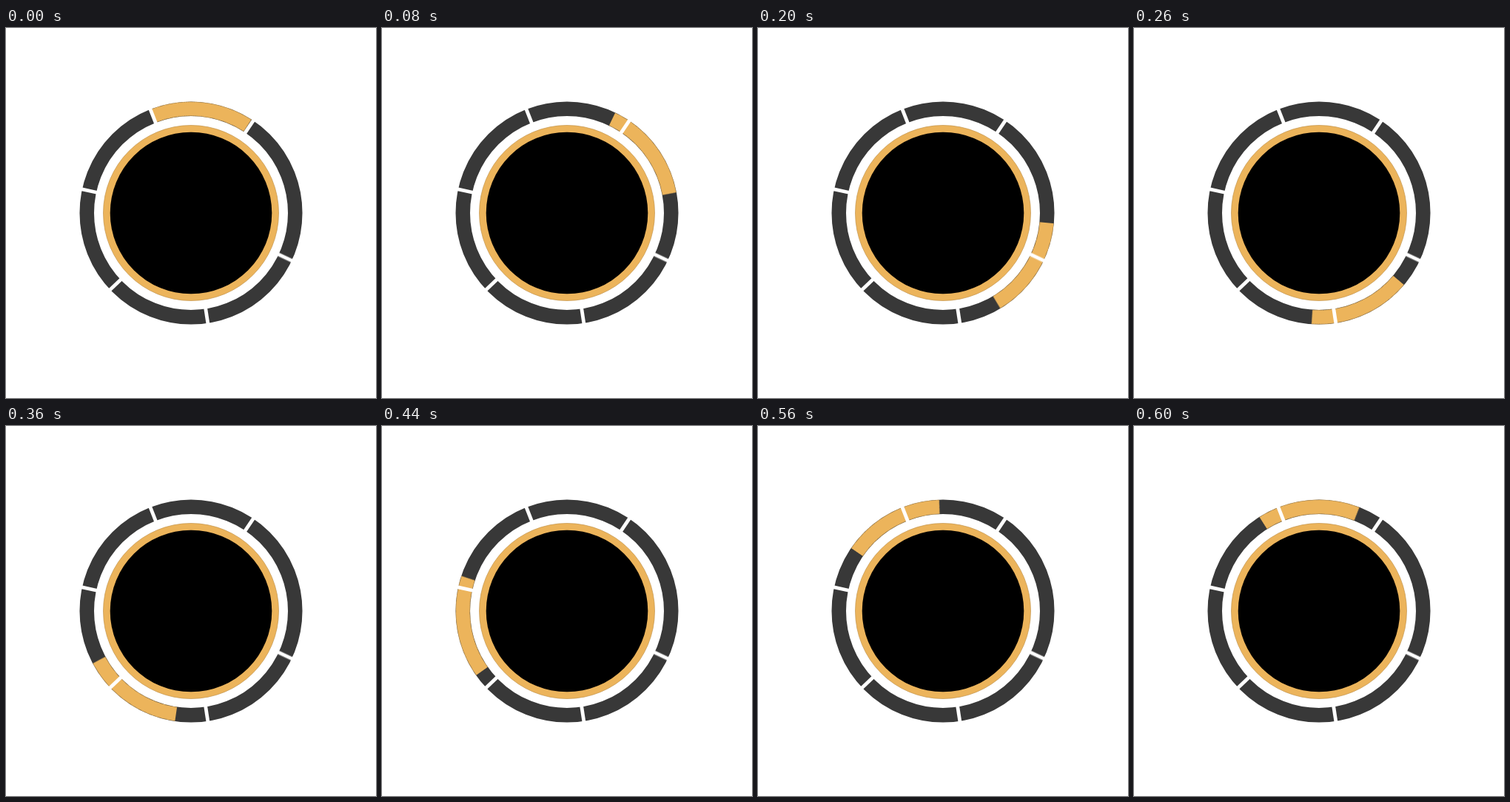
An HTML page that plays this animation: 500x500 px, repeating every 620 ms.

```html
<!DOCTYPE html>
<html lang="en">
<head>
<meta charset="utf-8">
<title>Ring loader</title>
<style>
  html, body { margin: 0; width: 100%; height: 100%; overflow: hidden; background: #fff; }
  svg { display: block; width: 100%; height: 100%; }
  circle { fill: none; }
  .track { stroke: #383838; stroke-width: 19.5; }
  .sweep {
    stroke: #ecb45b;
    stroke-width: 19;
    stroke-dasharray: 53.6 306.4;
    transform-origin: 250px 250px;
    animation: turn 620ms steps(31) infinite;
  }
  .gaps { stroke: #fff; stroke-width: 4.8; }
  .rim { fill: #ecb45b; stroke: #c2924a; stroke-width: .7; }
  .core { fill: #000; }
  /* Angles count from three o'clock */
  @keyframes turn {
    from { transform: rotate(-110.75deg); }
    to { transform: rotate(249.25deg); }
  }
</style>
</head>
<body>
<svg viewBox="0 0 500 500">
  <defs><path id="gap" d="M250 122V97"/></defs>
  <circle class="track" cx="250" cy="250" r="140.75"/>
  <circle class="sweep" cx="250" cy="250" r="140.75" pathLength="360"/>
  <g class="gaps">
    <use href="#gap" transform="rotate(-21.4 250 250)"/>
    <use href="#gap" transform="rotate(34 250 250)"/>
    <use href="#gap" transform="rotate(115.3 250 250)"/>
    <use href="#gap" transform="rotate(171.3 250 250)"/>
    <use href="#gap" transform="rotate(226.5 250 250)"/>
    <use href="#gap" transform="rotate(282.3 250 250)"/>
  </g>
  <circle class="rim" cx="250" cy="250" r="118.5"/>
  <circle class="core" cx="250" cy="250" r="109.3"/>
</svg>
</body>
</html>
```
